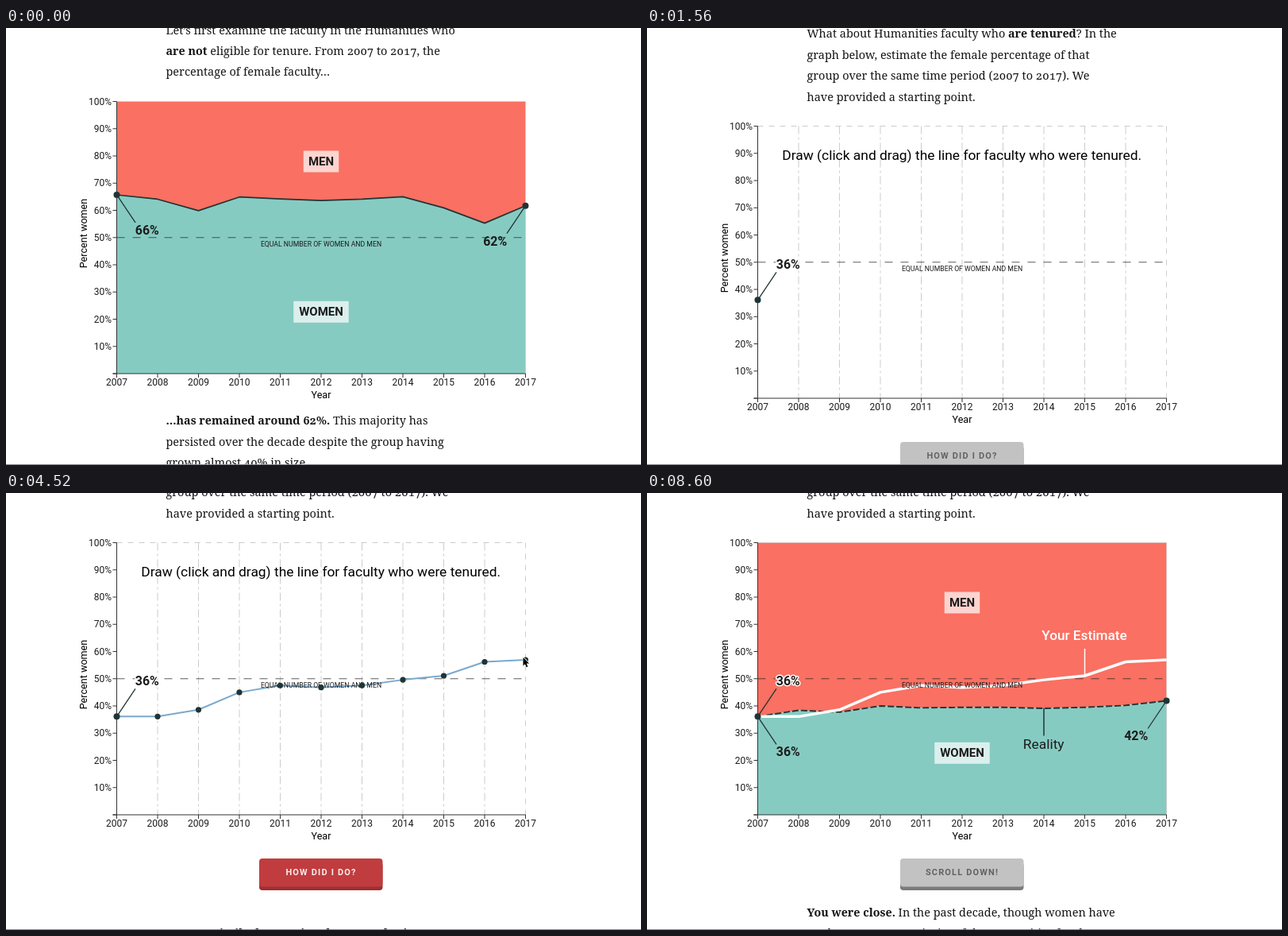
Animation, 800 px wide and 550 px high, one loop 8.64 s. Source, as an HTML page with a canvas:

```html
<!DOCTYPE html>
<html lang="en">
<head>
<meta charset="utf-8">
<title>Draw the line</title>
<style>
html, body { margin: 0; width: 100%; height: 100%; overflow: hidden; background: #fff; }
svg, canvas { position: absolute; left: 0; top: 0; width: 800px; height: 550px; }
svg { overflow: hidden; }
text { font: 14.45px "Noto Serif", serif; font-variant-numeric: oldstyle-nums; fill: #151515; white-space: pre; }
.b { font-weight: 700; font-size: 14.3px; }
</style>
</head>
<body>
<svg viewBox="0 0 800 550">
  <g id="page">
    <text x="201.5" y="7.6">Let’s first examine the faculty in the Humanities who</text>
    <text x="201.5" y="34"><tspan class="b">are not</tspan> eligible for tenure. From 2007 to 2017, the</text>
    <text x="201.5" y="60.4">percentage of female faculty…</text>
    <text x="201.5" y="499.4"><tspan class="b">…has remained around 62%.</tspan> This majority has</text>
    <text x="201.5" y="525.8">persisted over the decade despite the group having</text>
    <text x="201.5" y="552.2">grown almost 40% in size.</text>
    <text x="201.5" y="617.4">What about Humanities faculty who <tspan class="b">are tenured</tspan>? In the</text>
    <text x="201.5" y="643.8">graph below, estimate the female percentage of that</text>
    <text x="201.5" y="670.2">group over the same time period (2007 to 2017). We</text>
    <text x="201.5" y="696.8">have provided a starting point.</text>
    <g id="next"><text class="b" x="201.5" y="1224.6">We now similarly examine the Natural Sciences next</text></g>
    <g id="answer">
      <text x="201.5" y="1198.6"><tspan class="b">You were close.</tspan> In the past decade, though women have</text>
      <text x="201.5" y="1225">made up a strong majority of the Humanities faculty</text>
    </g>
  </g>
</svg>
<canvas id="stage"></canvas>
<script>
const LOOP = 8640;
const LEFT = 139.5, STEP = 51.5, RIGHT = LEFT + 10 * STEP, H = 342.5;
const RED = '#fa7062', TEAL = '#86cbc2', INK = '#1f3535', DARK = '#1c1c1c';
const FONT = 'Roboto, sans-serif';

const nonTenured = [65.7, 64.1, 59.9, 64.9, 64.2, 63.6, 64.1, 65, 60.9, 55.3, 61.7];
const guess = [36.1, 36.1, 38.6, 45, 47.5, 46.8, 47.5, 49.6, 51.1, 56.2, 56.9];
const reality = [36.1, 38.4, 37.7, 40, 39.3, 39.5, 39.5, 39.1, 39.5, 40.2, 41.9];

const CLICK = 5480, REVEAL = 6240;
const DRAW_START = 3360, DRAW_END = 4400;

const canvas = document.getElementById('stage');
const ctx = canvas.getContext('2d');
const ratio = window.devicePixelRatio || 1;
canvas.width = 800 * ratio;
canvas.height = 550 * ratio;
const page = document.getElementById('page');
const next = document.getElementById('next');
const answer = document.getElementById('answer');

const clamp = v => Math.max(0, Math.min(1, v));
const ramp = (t, a, b) => clamp((t - a) / (b - a));
const smooth = u => u * u * (3 - 2 * u);
const mix = (a, b, u) => a + (b - a) * u;
const px = i => LEFT + i * STEP;
const py = (top, v) => top + H * (1 - v / 100);

// [time, position, speed]
const scrollKeys = [[0, 0, 0.05], [840, 77, 0.25], [1560, 605, 0.35], [2020, 666, 0]];

function scrollAt(t) {
  for (let i = 0; i < scrollKeys.length - 1; i++) {
    const [t0, p0, v0] = scrollKeys[i], [t1, p1, v1] = scrollKeys[i + 1];
    if (t > t1) continue;
    const d = t1 - t0, u = (t - t0) / d, u2 = u * u, u3 = u2 * u;
    return Math.round((2 * u3 - 3 * u2 + 1) * p0 + (u3 - 2 * u2 + u) * d * v0 +
      (3 * u2 - 2 * u3) * p1 + (u3 - u2) * d * v1);
  }
  return 666;
}

function valueAt(data, pos) {
  const i = Math.min(9, Math.floor(pos));
  return mix(data[i], data[i + 1], pos - i);
}

function text(str, x, y, size, opt = {}) {
  ctx.font = `${opt.weight || 400} ${size}px ${FONT}`;
  ctx.textAlign = opt.align || 'center';
  ctx.letterSpacing = (opt.spacing || 0) + 'px';
  if (opt.halo) {
    ctx.strokeStyle = '#fff';
    ctx.lineWidth = 3;
    ctx.lineJoin = 'round';
    ctx.strokeText(str, x, y);
  }
  ctx.fillStyle = opt.color || DARK;
  ctx.fillText(str, x, y);
  ctx.letterSpacing = '0px';
}

function line(x1, y1, x2, y2, color, width = 1, dash = []) {
  ctx.beginPath();
  ctx.moveTo(x1, y1);
  ctx.lineTo(x2, y2);
  ctx.setLineDash(dash);
  ctx.strokeStyle = color;
  ctx.lineWidth = width;
  ctx.stroke();
  ctx.setLineDash([]);
}

function dot(x, y, r = 4) {
  ctx.beginPath();
  ctx.arc(x, y, r, 0, 7);
  ctx.fillStyle = INK;
  ctx.fill();
}

function faded(alpha, draw) {
  if (alpha <= 0) return;
  ctx.save();
  ctx.globalAlpha = alpha;
  draw();
  ctx.restore();
}

function curve(data, top, end = 10) {
  ctx.beginPath();
  ctx.moveTo(LEFT, py(top, data[0]));
  for (let i = 1; i <= 10 && i <= end; i++) ctx.lineTo(px(i), py(top, data[i]));
  if (end < 10) ctx.lineTo(px(end), py(top, valueAt(data, end)));
}

function strokeCurve(data, top, color, width, end, dash = []) {
  curve(data, top, end);
  ctx.setLineDash(dash);
  ctx.lineJoin = 'round';
  ctx.strokeStyle = color;
  ctx.lineWidth = width;
  ctx.stroke();
  ctx.setLineDash([]);
}

function areas(data, top) {
  ctx.fillStyle = RED;
  ctx.fillRect(LEFT, top, RIGHT - LEFT, H);
  // Clear first so the two colours never blend while fading.
  curve(data, top);
  ctx.lineTo(RIGHT, top + H);
  ctx.lineTo(LEFT, top + H);
  ctx.closePath();
  ctx.save();
  ctx.globalAlpha = 1;
  ctx.fillStyle = '#fff';
  ctx.fill();
  ctx.restore();
  ctx.fillStyle = TEAL;
  ctx.fill();
  line(LEFT, top, RIGHT, top, 'rgba(204,204,204,.6)');
  line(RIGHT, top, RIGHT, top + H, 'rgba(204,204,204,.6)');
}

function tag(str, top, y, w) {
  ctx.fillStyle = 'rgba(255,255,255,.7)';
  ctx.fillRect(397 - w / 2, top + y, w, 27);
  text(str, 397, top + y + 18.4, 15, { weight: 600 });
}

function tags(top) {
  tag('MEN', top, 62, 44.5);
  tag('WOMEN', top, 251.3, 69.5);
}

function callout(str, i, y, up, halo) {
  const x = px(i), side = i ? -1 : 1;
  line(x, y, x + side * 23.5, y + (up ? -35 : 35), INK, 1.3);
  text(str, x + side * 38.3, y + (up ? -39.5 : 50), 15.9, { weight: 600, halo });
}

function axes(top) {
  const base = top + H;
  line(LEFT, top, LEFT, base, '#333');
  line(LEFT - 5, base, RIGHT, base, '#333');
  for (let i = 0; i <= 10; i++) {
    const y = py(top, i * 10);
    line(LEFT - 5, y, LEFT, y, '#333');
    if (i) text(i * 10 + '%', 133, y + 4.2, 12, { align: 'right' });
    line(px(i), base, px(i), base + 5, '#333');
    text(String(2007 + i), px(i), base + 15.3, 12);
  }
  text('Year', 397, base + 31, 12.5, { color: '#000' });
  ctx.save();
  ctx.translate(101.7, top + 166);
  ctx.rotate(-Math.PI / 2);
  text('Percent women', 0, 0, 12.6, { color: '#000' });
  ctx.restore();
}

function halfLine(top) {
  line(LEFT, py(top, 50), RIGHT, py(top, 50), 'rgba(40,40,40,.75)', 1, [10, 10]);
}

function halfText(top) {
  text('EQUAL NUMBER OF WOMEN AND MEN', 397, py(top, 50) + 11.3, 8.7);
}

function grid(top) {
  for (let i = 1; i < 10; i++) line(px(i), top, px(i), top + H, '#ccc', 1, [10, 4, 3, 4]);
  line(LEFT, top, RIGHT, top, '#ccc', 1, [7, 7]);
  line(RIGHT, top, RIGHT, top + H, '#ccc', 1, [7, 7]);
}

function button(y, t) {
  const red = t >= 4440 && t < CLICK;
  const press = t > CLICK - 120 && t < CLICK ? 2 : 0;
  const box = (top, h, color) => {
    ctx.beginPath();
    ctx.roundRect(319, top, 155.5, h, 4);
    ctx.fillStyle = color;
    ctx.fill();
  };
  box(y + 5, 35, red ? '#9f2f31' : '#7b7b7b');
  box(y + press, 35.5, red ? '#c13c3e' : '#c2c2c2');
  text(t < CLICK ? 'HOW DID I DO?' : 'SCROLL DOWN!', 397, y + press + 20.8, 11,
    { weight: 600, spacing: 1.15, color: red ? '#fbeeee' : '#626262' });
}

function firstChart(top) {
  areas(nonTenured, top);
  halfLine(top);
  halfText(top);
  strokeCurve(nonTenured, top, INK, 1.7, 10);
  axes(top);
  callout('66%', 0, py(top, nonTenured[0]));
  callout('62%', 10, py(top, nonTenured[10]));
  dot(LEFT, py(top, nonTenured[0]));
  dot(RIGHT, py(top, nonTenured[10]));
  tags(top);
}

function drawnTo(t) {
  return 10 * smooth(ramp(t, DRAW_START, DRAW_END));
}

function secondChart(top, t) {
  const fill = ramp(t, 6400, 7040);
  const labels = ramp(t, REVEAL, 6840);
  const yellow = ramp(t, 2680, 2880) * (1 - ramp(t, 4360, 4500));
  const end = drawnTo(t);

  faded(yellow, () => {
    ctx.fillStyle = '#feffb8';
    ctx.fillRect(LEFT, top, RIGHT - LEFT, H);
  });
  if (t < CLICK) grid(top);
  faded(fill, () => areas(reality, top));
  halfLine(top);

  const wipe = 10 * ramp(t, CLICK, 6200);
  if (wipe > 0) strokeCurve(reality, top, INK, 1.9, wipe, [8, 3]);

  if (end > 0) {
    if (t < REVEAL) strokeCurve(guess, top, '#7ba9cc', 2, end);
    else {
      const u = ramp(t, REVEAL, 6600);
      const shade = [123, 169, 204].map(c => Math.round(mix(c, 255, u)));
      strokeCurve(guess, top, `rgb(${shade})`, mix(2, 3.5, u), 10);
    }
  }
  halfText(top);
  if (t < REVEAL) for (let i = 1; i <= end + 1e-6; i++) dot(px(i), py(top, guess[i]), 3.6);

  axes(top);
  if (t < CLICK)
    text('Draw (click and drag) the line for faculty who were tenured.', 396.7, top + 42.5, 17.4, { color: '#000' });

  const y0 = py(top, reality[0]), y10 = py(top, reality[10]);
  callout('36%', 0, y0, true, true);
  faded(labels, () => {
    callout('36%', 0, y0);
    callout('42%', 10, y10);
    dot(RIGHT, y10);
    line(px(7), py(top, reality[7]), px(7), top + 243, INK, 1.5);
    text('Reality', 499.7, top + 259, 17.4);
    line(px(8), top + 133.5, px(8), py(top, guess[8]), '#fff', 1.5);
    text('Your Estimate', 551, top + 122, 17.2, { weight: 500, color: '#fff' });
  });
  dot(LEFT, y0);
  faded(ramp(t, 7080, 7600), () => tags(top));
  button(top + 397.5, t);
}

// [time, x, y]
const moves = [
  [2380, 772, 340], [3160, 150.5, 281.5], [DRAW_START, 141, 281.5],
  [DRAW_END, 651.5, 207], [4640, 651.5, 207], [5260, 425, 478],
  [5760, 425, 478], [6180, 664, 250], [6480, 752, 4]
];

function cursorAt(t) {
  if (t >= DRAW_START && t <= DRAW_END) {
    const pos = drawnTo(t);
    return [mix(141, 651.5, pos / 10), py(62.5, valueAt(guess, pos)) - 3 * pos / 10];
  }
  for (let i = 0; i < moves.length - 1; i++) {
    const [t0, x0, y0] = moves[i], [t1, x1, y1] = moves[i + 1];
    if (t < t0 || t > t1) continue;
    const u = smooth(ramp(t, t0, t1));
    return [mix(x0, x1, u), mix(y0, y1, u)];
  }
  return null;
}

function cursor(t) {
  const at = cursorAt(t);
  if (!at) return;
  ctx.save();
  ctx.translate(at[0], at[1]);
  ctx.beginPath();
  [[0, 0], [0, 10.5], [2.4, 8.3], [4.1, 12.2], [5.9, 11.4], [4.3, 7.6], [7.6, 7.4]]
    .forEach(p => ctx.lineTo(p[0], p[1]));
  ctx.closePath();
  ctx.lineJoin = 'round';
  ctx.lineWidth = 1.6;
  ctx.strokeStyle = '#fff';
  ctx.stroke();
  ctx.fillStyle = '#000';
  ctx.fill();
  ctx.restore();
}

function render(t) {
  const scroll = scrollAt(t);
  page.setAttribute('transform', `translate(0 ${-scroll})`);
  next.setAttribute('opacity', t < REVEAL ? 1 : 0);
  answer.setAttribute('opacity', ramp(t, REVEAL, 6480));

  ctx.setTransform(ratio, 0, 0, ratio, 0, 0);
  ctx.clearRect(0, 0, 800, 550);
  if (scroll < 480) firstChart(92.5 - scroll);
  if (scroll > 170) secondChart(728.5 - scroll, t);
  cursor(t);
  ctx.fillStyle = '#8a8a8a';
  ctx.fillRect(0, 549, 800, 1);
}

const start = performance.now();
function tick() {
  render((performance.now() - start) % LOOP);
  requestAnimationFrame(tick);
}
tick();
</script>
</body>
</html>
```
